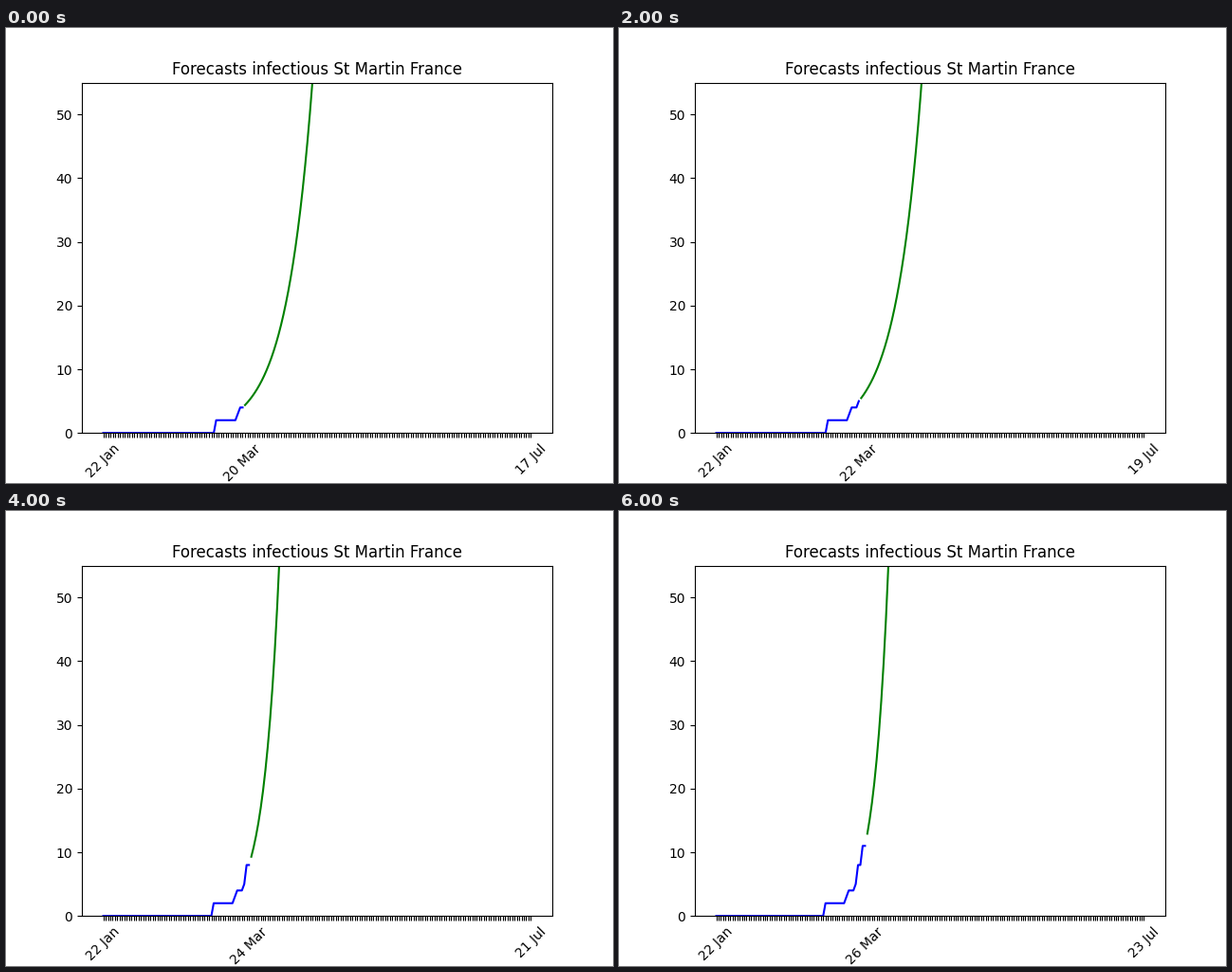
Write a matplotlib script that moves like this. It is 640 by 480 pixels and loops after 7 s.

```python
import numpy as np
import matplotlib.pyplot as plt
from matplotlib.animation import FuncAnimation

HORIZON = 120    # forecast days
FIRST_DAY = 58   # index of 20 Mar, counted from 22 Jan

CASES = [0] * 47 + [2] * 9 + [3] + [4] * 3 + [5, 8, 8, 11, 11]
GROWTH = [0.0903, 0.0855, 0.0908, 0.1281, 0.1500, 0.1637, 0.1603]

fig, ax = plt.subplots(figsize=(6.4, 4.8), dpi=100)


def draw(i):
    today = FIRST_DAY + i
    last = today + HORIZON
    ahead = np.arange(1, HORIZON + 1)

    ax.clear()
    ax.plot(range(today + 1), CASES[:today + 1], color="blue")
    ax.plot(today + ahead, CASES[today] * np.exp(GROWTH[i] * ahead), color="green")

    labels = [""] * (last + 1)
    labels[0] = "22 Jan"
    labels[today] = f"{20 + i} Mar"
    labels[last] = f"{17 + i} Jul"
    ax.set_xticks(range(last + 1), labels, rotation=45)
    ax.set_yticks(range(0, 51, 10))
    ax.set_xlim(-0.05 * last, 1.05 * last)
    ax.set_ylim(0, 55)
    ax.set_title("Forecasts infectious St Martin France")
    return ax.lines


anim = FuncAnimation(fig, draw, frames=len(GROWTH), init_func=lambda: draw(0),
                     interval=1000, repeat=True, repeat_delay=0)
plt.show()
```
